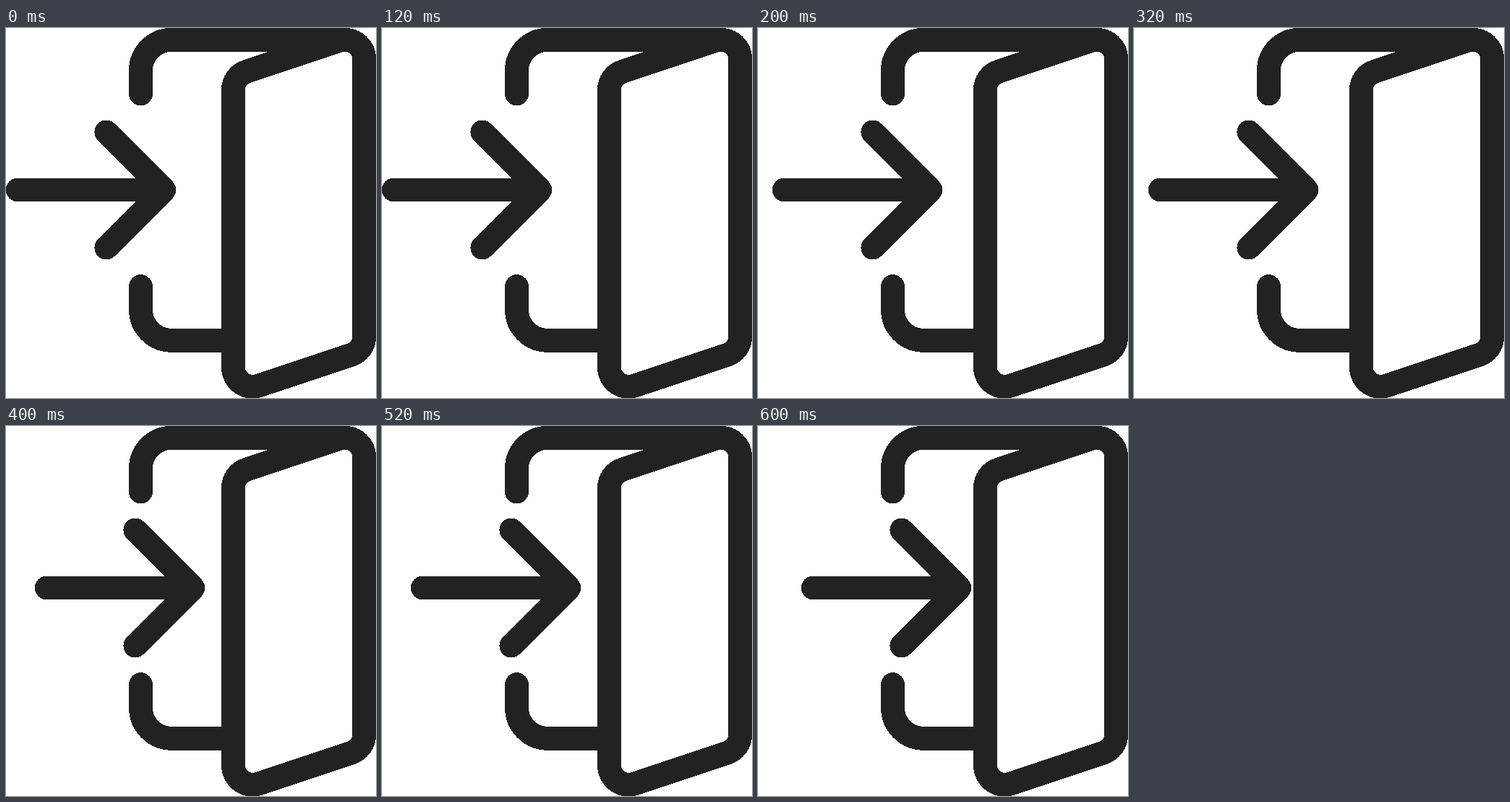
Write an HTML page that moves like this. It is 512 px wide and 512 px high and loops after 800 ms.

```html
<!DOCTYPE html>
<html lang="en">
<head>
<meta charset="utf-8">
<title>Enter</title>
<style>
  html, body { margin: 0; height: 100%; overflow: hidden; background: #fff; }
  svg { display: block; width: 100%; height: 100%; }
  path { fill: none; stroke: #222; stroke-width: 32.9; stroke-linecap: round; stroke-linejoin: round; }
</style>
</head>
<body>
<svg viewBox="0 0 512 512" shape-rendering="crispEdges">
  <g transform="translate(-.2 .3)">
    <!-- door frame -->
    <path d="M186.67 90.67V58.67A42.67 42.67 0 0 1 229.33 16H469.33
             M186.67 357.33V389.33A42.67 42.67 0 0 0 229.33 432H314.67"/>
    <!-- open door -->
    <path d="M314.67 85.33A26.67 26.67 0 0 1 332.9 60.03L460.9 17.37
             A26.67 26.67 0 0 1 496 42.67V426.67
             A26.67 26.67 0 0 1 477.77 451.97L349.77 494.63
             A26.67 26.67 0 0 1 314.67 469.33Z"/>
  </g>
  <path id="arrow" d="M16.2 224H218.87M138.87 144L218.87 224L138.87 304"/>
</svg>
<script>
  const STEP_MS = 200, STEPS = 4, STEP_PX = 20;
  const arrow = document.getElementById("arrow");

  function draw() {
    const step = Math.floor(performance.now() / STEP_MS) % STEPS;
    arrow.setAttribute("transform", `translate(${step * STEP_PX} 0)`);
    requestAnimationFrame(draw);
  }
  draw();
</script>
</body>
</html>
```
